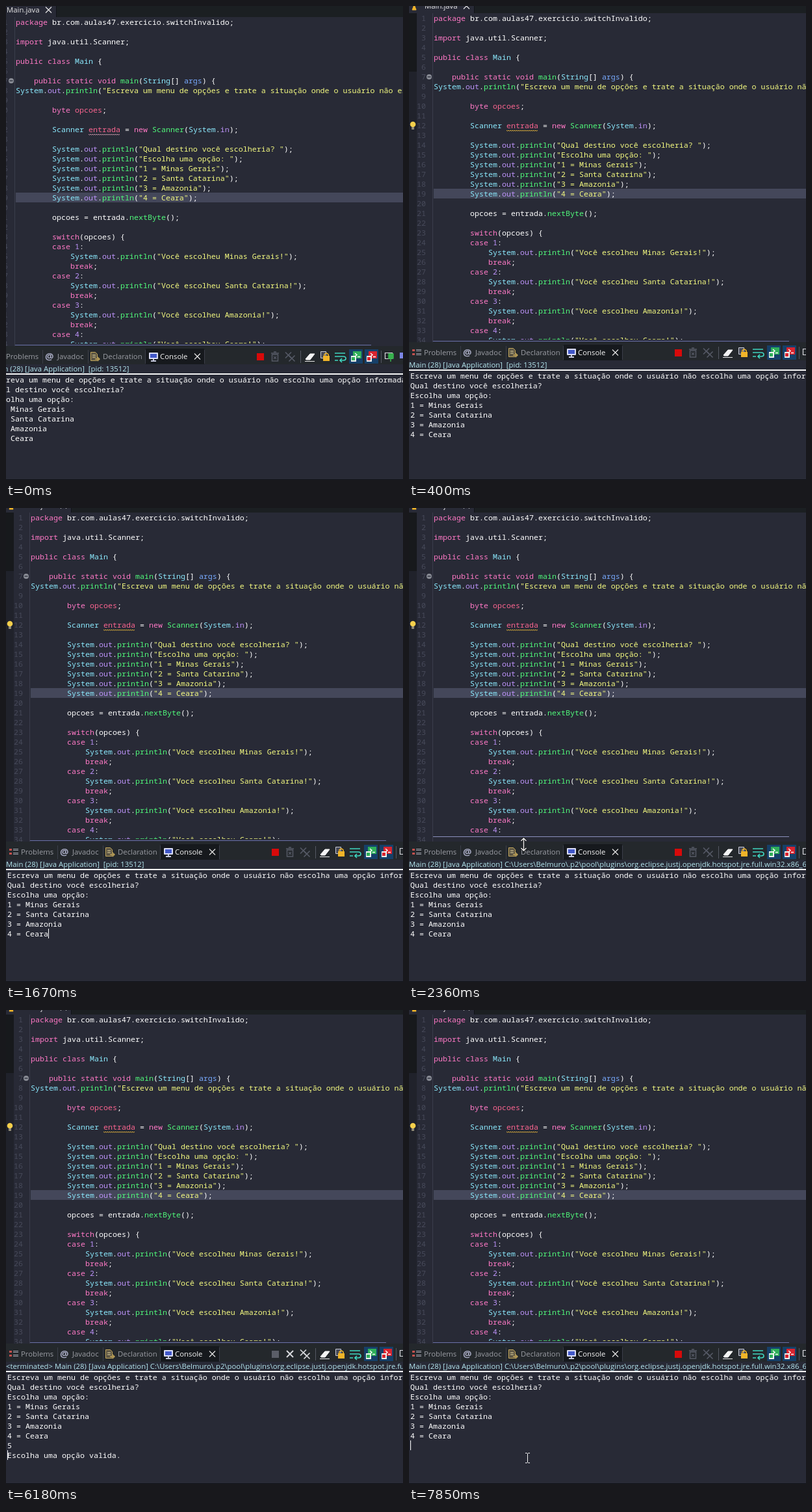
These frames come from a looping animation (611x729 px, 8 s). An HTML page:

```html
<!DOCTYPE html>
<html lang="pt-BR">
<head>
<meta charset="utf-8">
<title>Console</title>
<style>
html, body { margin: 0; width: 100%; height: 100%; overflow: hidden; background: #282a36; }
svg { display: block; width: 611px; height: 729px; }
text { white-space: pre; }
.mono { font: 500 11.667px "Noto Sans Mono", "DejaVu Sans Mono", monospace; fill: #fff; }
.ui { font: 11.35px "Open Sans", "Noto Sans", sans-serif; fill: #9a9ca3; }
.at { font-size: 15px; font-weight: bold; }
</style>
</head>
<body>
<svg id="stage" viewBox="0 0 611 729" xmlns="http://www.w3.org/2000/svg">
  <g id="window"></g>
  <g id="overlay"></g>
</svg>
<script>
const LOOP = 8000;
const BG = '#282a36', BAR = '#1b1f22', VIEW_BAR = '#24282c', PINK = '#ff79c6', CYAN = '#8be9fd',
      GREEN = '#50fa7b', PURPLE = '#bd93f9', YELLOW = '#f4fa80', WHITE = '#fff', GREY = '#555965';

const esc = s => s.replace(/&/g, '&amp;').replace(/</g, '&lt;');
const rect = (x, y, w, h, fill, extra = '') =>
  `<rect x="${x}" y="${y}" width="${w}" height="${h}" fill="${fill}" ${extra}/>`;
const path = (d, stroke, width = 1, fill = 'none') =>
  `<path d="${d}" stroke="${stroke}" stroke-width="${width}" fill="${fill}"/>`;
const label = (x, y, s, cls, fill, extra = '') =>
  `<text x="${x}" y="${y}" class="${cls}" ${fill ? `style="fill:${fill}"` : ''} ${extra}>${esc(s)}</text>`;
const cross = (x, y, r, color, width = 1.2) =>
  path(`M${x - r} ${y - r}l${2 * r} ${2 * r}m0 ${-2 * r}l${-2 * r} ${2 * r}`, color, width);

// Editor source; "~" marks a declared variable.
const QUESTION = 'Escreva um menu de opções e trate a situação onde o usuário não escolha uma opção informada!';
const MENU = ['Qual destino você escolheria? ', 'Escolha uma opção: ', '1 = Minas Gerais',
  '2 = Santa Catarina', '3 = Amazonia', '4 = Ceara'];
const print = s => `System.out.println("${s}");`;
const pad = n => ' '.repeat(n);
const cases = ['Minas Gerais', 'Santa Catarina', 'Amazonia', 'Ceara'].flatMap((place, i) => [
  pad(8) + `case ${i + 1}:`, pad(12) + print(`Você escolheu ${place}!`), pad(12) + 'break;']);
const source = [
  'package br.com.aulas47.exercicio.switchInvalido;', '', 'import java.util.Scanner;', '',
  'public class Main {', '', '    public static void main(String[] args) {', print(QUESTION), '',
  pad(8) + 'byte ~opcoes;', '', pad(8) + 'Scanner ~entrada = new Scanner(System.in);', '',
  ...MENU.map(s => pad(8) + print(s)), '',
  pad(8) + 'opcoes = entrada.nextByte();', '', pad(8) + 'switch(opcoes) {', ...cases
].slice(0, 34);

const palette = {};
const paint = (color, words) => words.split(' ').forEach(w => palette[w] = color);
paint(PINK, 'package import public class static void byte new switch case break');
paint(CYAN, 'Main System String Scanner');
paint(PURPLE, 'out in 1 2 3 4');
paint('#79abff', 'args');

function colorOf(token, isCall) {
  if (token[0] === '"') return YELLOW;
  if (token[0] === '~') return '#f9648f';
  if (isCall && palette[token] !== PINK) return GREEN;
  return palette[token] || WHITE;
}
function codeLine(line, i) {
  const tokens = line.match(/"[^"]*"|~\w+|\.Scanner|\w+|[^\w"~]/g) || [];
  const spans = tokens.map((t, k) => {
    const isCall = /^\w/.test(t) && tokens[k + 1] === '(';
    return `<tspan fill="${colorOf(t, isCall)}">${esc(t.replace('~', ''))}</tspan>`;
  });
  const y = 15 * i + 19;
  return label(26, y, String(i + 1), 'mono', '#474a5a', 'text-anchor="end"') +
    `<text x="38" y="${y}" class="mono">${spans.join('')}</text>`;
}

function editor() {
  const wave = 'M150 187' + 'l1.5 1.5l1.5 -1.5'.repeat(16);
  return rect(0, -20, 640, 27, BAR) + rect(0, -20, 100, 27, BG) +
    path('M100.5 -20V7', '#111319') +
    path('M8 -6L11 2H5Z', '#f0b429', 1, '#f0b429') +
    label(24, 0, 'Main.java', 'ui', '#e8e8e8') + cross(88.5, -4, 4.5, '#e8e8e8') +
    rect(0, 7, 12, 507, '#20222b') + rect(0, 7, 12, 90, '#17191c') +
    rect(38, 277, 600, 15, '#44475a') +
    path('M36.5 7V513', '#3a3d4b') +
    source.map(codeLine).join('') +
    `<path id="wave" d="${wave}" fill="none" stroke-width="1"/>` +
    '<circle cx="31" cy="105" r="4" fill="#8a8d96"/>' + path('M28.5 105h5', BG, 1.3) +
    '<circle cx="6" cy="178" r="4.3" fill="#f5cf4b"/>' + rect(4, 182, 4, 4, '#8f8a78') +
    '<g id="scrollbar"></g>';
}

function tabs() {
  const divider = x => path(`M${x}.5 519V540`, '#3b3e49');
  const list = [5, 11].map(dy => rect(5, 519 + dy, 4, 3, '#c2514e') +
    rect(11, 519 + dy, 8, 1, '#9b9ea8') + rect(11, 521 + dy, 8, 1, '#9b9ea8')).join('');
  return rect(0, 513, 640, 28, VIEW_BAR) + rect(238, 517, 90, 24, '#16191d') +
    [79, 149, 237, 328].map(divider).join('') + list +
    label(23, 533, 'Problems', 'ui') +
    label(83, 534, '@', 'ui at', '#a9acc4') +
    label(102, 533, 'Javadoc', 'ui') +
    path('M153.5 522.5h7l3 3v10h-10z', '#c3a75a', 1, '#5d5644') +
    path('M156 527h5m-5 3h5', '#e6d8a0') + path('M160 533h7m-3 -3l3 3l-3 3', '#c3a75a', 1.3) +
    label(172, 533, 'Declaration', 'ui') +
    rect(243, 523, 14, 10, '#d9dcf5', 'rx="1"') + rect(245, 525, 10, 6, '#4258c9') +
    rect(246, 535, 8, 2, '#c5c8dd') + rect(249, 533, 2, 2, '#c5c8dd') +
    label(260, 533, 'Console', 'ui', '#f4f4f4') + cross(317.5, 529, 4.5, '#e4e4e4');
}

function terminalButton(x, color) {
  return rect(x, 518, 21, 22, '#164069') +
    rect(x + 6, 521, 13, 11, color) + path(`M${x + 9} 524l3 2.5l-3 2.5m4 .5h4`, '#fff', 1.4) +
    rect(x + 3, 528, 8, 9, '#eef2f0') + rect(x + 4, 530, 5, 5, color);
}
function toolbar() {
  const separator = x => path(`M${x}.5 520V539`, '#555863');
  return '<g id="runState"></g>' + separator(476) +
    path('M484 533l7 -8h7l-7 9h-6z', '#fff', 1, '#f4f4f4') + path('M483 536.5h15', '#e8e8e8') +
    path('M507.5 521.5h8v10h-8z', '#c9ccd6', 1, '#454958') +
    rect(511, 528, 10, 8, '#f0b429') + path('M513 528v-2q3 -4 6 0v2', '#f0b429', 1.6) +
    path('M529 524h16M529 529h13q4 0 4 3t-4 3h-4M529 535h5M540 532l-3 3l3 3', '#3fd6c0', 1.7) +
    terminalButton(551, '#2fae5a') + terminalButton(575, '#d8242f') + separator(600) +
    path('M606.5 523.5h11v9h-11z', '#d9d9df', 1.2) +
    path('M612 525h7v7h-7zM615 532v5', '#37b24d', 1.5, '#37b24d') +
    rect(629, 523, 11, 9, '#7d86e6');
}

function runState(ended) {
  const light = '#d7d8dc';
  const pair = cross(457.5, 527, 4.5, ended ? light : GREY, 1.7) + cross(463, 532, 4.5, ended ? light : GREY, 1.7);
  const middle = ended ? cross(437, 529, 5, light, 2)
    : path('M431 524h12M435 522h4M432.5 526h9v10h-9z', GREY, 1.5) + cross(437, 531, 2, GREY);
  return rect(409, 524, 11, 11, ended ? '#5b5e68' : '#d80a0a') + middle + pair;
}

const JRE = 'C:\\Users\\Belmuro\\.p2\\pool\\plugins\\org.eclipse.justj.openjdk.hotspot.jre.full.win32.x86_64';
const TITLE = 'Main (28) [Java Application] ';
const MENU_OUTPUT = [QUESTION, ...MENU];

// Each track lists [start time, value...]; a value holds until the next one.
const pan = [[0, -23, 10], [130, -12, 7], [260, -4, 4], [400, 0, 4], [660, 0, 2], [810, 0, 0]];
const titles = [[0, TITLE + ' [pid: 13512]'], [1790, TITLE + JRE],
  [4090, '<terminated> ' + TITLE + JRE], [7040, TITLE + JRE]];
const outputs = [[0, MENU_OUTPUT], [3950, [...MENU_OUTPUT, '5']],
  [4090, [...MENU_OUTPUT, '5', 'Escolha uma opção valida.']], [7190, []], [7320, MENU_OUTPUT]];
const carets = [[0], [1670, 65, 655], [1940], [2920, 2, 670], [3380], [3950, 9, 670], [4090, 2, 685],
  [4650], [5180, 2, 685], [5600], [6180, 2, 685], [6760], [7850, 2, 670]];
const pointers = [[0], [1940, 201, 583], [2060], [2210, 120, 328], [2360, 176, 517, true],
  [2620, 180, 629], [2770, 185, 673], [4090], [4920, 332, 714], [5050, 300, 669], [5180],
  [5750, 273, 501], [5900], [7320, 560, 144], [7460], [7580, 210, 640], [7700, 182, 689]];

const at = (track, t) => track.filter(k => k[0] <= t).pop().slice(1);

function pointer([x, y, resize]) {
  if (x === undefined) return '';
  const d = resize
    ? `M${x + .5} ${y - 9}v19m-4 -4l4 4l4 -4m-8 -11l4 -4l4 4`
    : `M${x - 3} ${y - 7.5}h2.5l1 1l1 -1h2.5M${x + .5} ${y - 7}v14M${x - 3} ${y + 7.5}h2.5l1 -1l1 1h2.5`;
  return (resize ? path(d, '#111', 3) : '') + path(d, '#f4f4f4', resize ? 1.4 : 1);
}

const $ = id => document.getElementById(id);
$('window').innerHTML = editor() + tabs() + toolbar() + rect(0, 541, 640, 14, BG) +
  '<g id="title"></g>' + rect(0, 555, 640, 2, '#f4f4f4') + '<g id="output"></g>';

const shown = {};
function show(id, markup) {
  if (shown[id] !== markup) $(id).innerHTML = shown[id] = markup;
}

function render(t) {
  const hover = t >= 2360 && t < 2920;
  const [caretX, caretY] = at(carets, t);
  $('window').setAttribute('transform', `translate(${at(pan, t)})`);
  $('wave').setAttribute('stroke', t < 260 ? '#cf9aae' : '#e5b53a');
  show('scrollbar', hover
    ? rect(37, 503, 603, 10, BG) + rect(37, 505, 548, 1, '#8b91bd')
    : rect(37, 509, 603, 4, BG) + rect(37, 511, 548, 1, '#6870a4'));
  show('runState', runState(t >= 4090 && t < 7190));
  show('title', label(0, 552, at(titles, t)[0], 'ui', '#b4e6ef'));
  show('output', at(outputs, t)[0].map((s, i) => label(2, 569 + 15 * i, s, 'mono')).join(''));
  show('overlay', (caretX ? rect(caretX, caretY - 8, 1, 15, '#fff') : '') +
    pointer(at(pointers, t)) + rect(0, 728, 611, 1, '#0e0f14'));
}

const start = performance.now();
function frame() {
  render((performance.now() - start) % LOOP);
  requestAnimationFrame(frame);
}
render(0);
requestAnimationFrame(frame);
</script>
</body>
</html>
```
